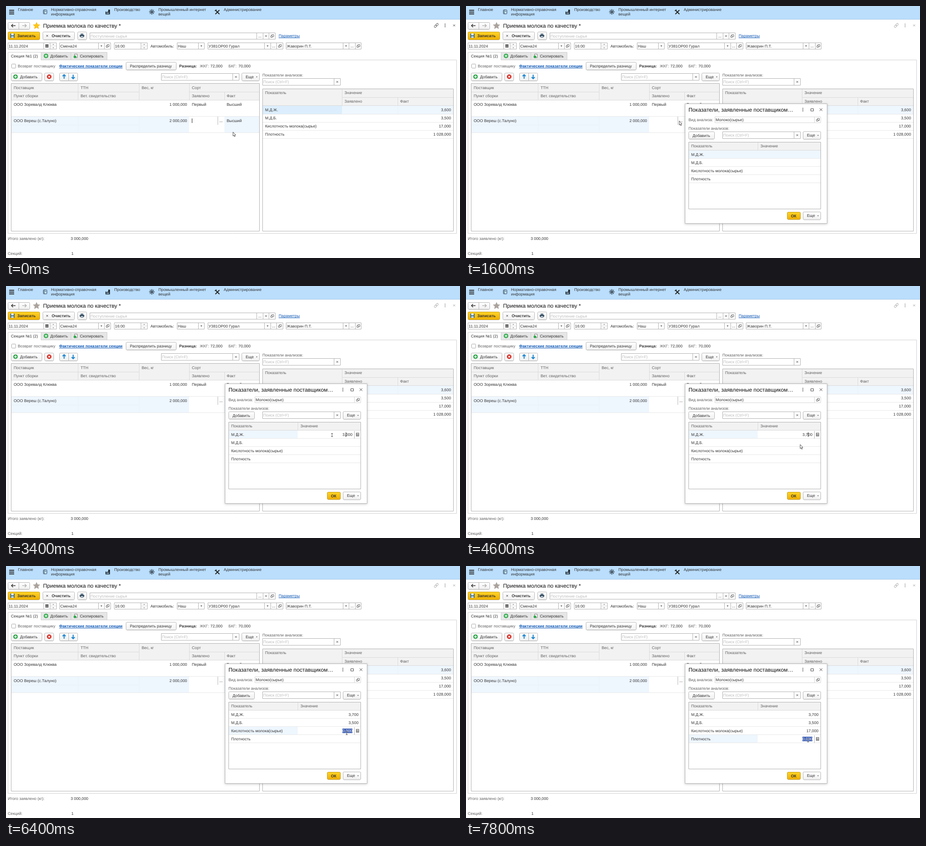
An HTML page with a canvas that plays this animation: 1004 by 558 pixels, repeating every 8 s.

```html
<!DOCTYPE html>
<html lang="ru">
<head>
<meta charset="utf-8">
<style>
html, body { margin: 0; width: 100%; height: 100%; overflow: hidden; background: #fff; }
canvas { display: block; }
</style>
</head>
<body>
<canvas id="stage" width="1004" height="558"></canvas>
<script>
const ctx = document.getElementById('stage').getContext('2d');
const LOOP = 8000, TICK = 200;
const FACE = '"Liberation Sans", Arial, sans-serif';
const TITLE = { size: 12.2, color: '#111' };
const INK = '#333', DIM = '#606060', PALE = '#bcbcbc', LINK = '#0b56b5';
const EDGE = '#b0b0b0', RULE = '#dadada', SOFT = '#e8e8e8', HEAD = '#f2f2f2', TINT = '#eef6fe';
const TINT_RULE = '#e8f0f8';

// time, x, y of the pointer
const PATH = [
  [0, 502, 279], [200, 490, 272], [400, 477, 264], [600, 467, 258], [800, 465, 256],
  [1000, 471.5, 254.5], [1600, 471.5, 254.5], [1800, 520, 280], [2000, 620, 315],
  [2200, 710, 329], [2400, 720, 330], [2600, 721, 330], [3800, 721, 330], [4200, 732, 344],
  [4600, 739, 351], [4800, 742, 354], [5000, 742.5, 354], [5800, 742.5, 354],
  [6200, 751, 367], [6400, 753.5, 370], [7400, 753.5, 370], [7600, 755, 381], [7800, 756.5, 386]
];
const BEAMS = [[2600, 3800], [6400, 7600], [7800, 8000]];

// time, edited row, text, caret index (-1: all selected, -2: not editing)
const EDITS = [
  [1600, 0, '', -2], [2400, 0, '0,000', -1], [3200, 0, '3,000', 1], [3400, 0, '3,000', 2],
  [3800, 0, '3,700', 3], [4800, 1, '0,000', -1], [5600, 1, '3,000', 2], [5800, 1, '3,500', 3],
  [6200, 2, '0,000', -1], [7200, 2, '17,000', 2], [7400, 2, '17,000', 3], [7800, 3, '0,000', -1]
];
const METRICS = ['М.Д.Ж.', 'М.Д.Б.', 'Кислотность молока(сырье)', 'Плотность'];
const DONE = ['3,700', '3,500', '17,000'];

function rect(x, y, w, h, color) {
  ctx.fillStyle = color;
  ctx.fillRect(x, y, w, h);
}
const hline = (x1, x2, y, color = RULE) => rect(x1, y, x2 - x1, 1, color);
const vline = (x, y1, y2, color = RULE) => rect(x, y1, 1, y2 - y1, color);

function frame(x1, y1, x2, y2, fill = '#fff', edge = EDGE, r = 0) {
  ctx.beginPath();
  ctx.roundRect(x1 + .5, y1 + .5, x2 - x1, y2 - y1, r);
  ctx.fillStyle = fill;
  ctx.fill();
  ctx.strokeStyle = edge;
  ctx.lineWidth = 1;
  ctx.stroke();
}

function text(s, x, y, { color = INK, bold = false, size = 8.78, right = false } = {}) {
  ctx.font = `${bold ? 'bold ' : ''}${size}px ${FACE}`;
  ctx.textAlign = right ? 'right' : 'left';
  ctx.fillStyle = color;
  ctx.fillText(s, x, y + size * .36);
  return ctx.measureText(s).width;
}
function link(s, x, y, bold) {
  const w = text(s, x, y, { color: LINK, bold });
  rect(x, y + 4, w, 1, LINK);
}

function stroke(points, color = '#444', width = 1) {
  ctx.beginPath();
  points.forEach(([x, y], i) => i ? ctx.lineTo(x, y) : ctx.moveTo(x, y));
  ctx.strokeStyle = color;
  ctx.lineWidth = width;
  ctx.stroke();
}
function poly(points, fill, edge) {
  ctx.beginPath();
  points.forEach(([x, y]) => ctx.lineTo(x, y));
  ctx.closePath();
  ctx.fillStyle = fill;
  ctx.fill();
  if (edge) { ctx.strokeStyle = edge; ctx.lineWidth = .8; ctx.stroke(); }
}
function disc(x, y, r, color) {
  ctx.beginPath();
  ctx.arc(x, y, r, 0, Math.PI * 2);
  ctx.fillStyle = color;
  ctx.fill();
}
function cross(x, y, r = 2, color = '#555', width = 1) {
  stroke([[x - r, y - r], [x + r, y + r]], color, width);
  stroke([[x - r, y + r], [x + r, y - r]], color, width);
}
const triangle = (x, y, r = 2, dir = 1) =>
  poly([[x - r, y - dir * r / 2], [x + r, y - dir * r / 2], [x, y + dir * r / 2 + dir * .4]], '#444');
function dots(x, y, color = '#444') {
  for (const d of [-2.5, 0, 2.5]) rect(x + d - .5, y + 2, 1, 1, color);
}
function kebab(x, y, color = '#555') {
  for (const d of [-3, 0, 3]) disc(x, y + d, 1, color);
}
function openIcon(x, y) {
  frame(x - 1.5, y - 3.5, x + 3, y + 1, '#fff', '#666');
  frame(x - 3.5, y - 1, x, y + 2.5, '#fff', '#666');
}
function plus(x, y) {
  disc(x, y, 5, '#2fa84a');
  stroke([[x - 3, y], [x + 3, y]], '#fff', 1.6);
  stroke([[x, y - 3], [x, y + 3]], '#fff', 1.6);
}
function arrow(x, y, dx, dy, color, width) {
  const tip = [x + dx * 4.5, y + dy * 4.5];
  stroke([[x - dx * 4.5, y - dy * 4.5], tip], color, width);
  const back = s => [x + dx + dy * s, y + dy + dx * s];
  stroke([back(3.5), tip, back(-3.5)], color, width);
}

function button(x1, y1, x2, y2, gold) {
  const g = ctx.createLinearGradient(0, y1, 0, y2);
  g.addColorStop(0, gold ? '#ffd42a' : '#fff');
  g.addColorStop(1, gold ? '#efb000' : '#f1f1f1');
  hline(x1 + 2, x2 - 1, y2 + 1, '#e4e4e4');
  frame(x1, y1, x2, y2, g, gold ? '#c79a13' : '#b5b5b5', 2);
}
function more(x, y) {
  button(x, y, x + 39, y + 17);
  text('Еще', x + 9, y + 8.5);
  triangle(x + 33.5, y + 9, 1.5);
}

// Input box; each part is [divider x, icon]
function field(x1, y1, x2, y2, value, parts = [], color = INK) {
  frame(x1, y1, x2, y2);
  const mid = (y1 + y2 + 1) / 2;
  text(value, x1 + 2, mid, { color });
  parts.forEach(([x, icon], i) => {
    vline(x, y1 + 1, y2, EDGE);
    const cx = (x + (parts[i + 1]?.[0] ?? x2) + 1) / 2;
    if (icon === 'spin') {
      hline(x, x2, Math.floor(mid), RULE);
      triangle(cx, mid - 3.5, 1.4, -1);
      triangle(cx, mid + 4, 1.4);
    } else icon(cx, mid);
  });
}
const search = (x, y) => field(x, y, x + 172, y + 15, 'Поиск (Ctrl+F)', [[x + 158, cross]], PALE);
function calendar(x, y) {
  rect(x - 3.5, y - 3.5, 7, 7, '#555');
  for (let i = 0; i < 6; i++) rect(x - 2.5 + i % 3 * 2, y - 1 + (i / 3 | 0) * 2, 1, 1, '#fff');
}

function star(x, y, dimmed) {
  const pts = Array.from({ length: 10 }, (_, i) => {
    const r = i % 2 ? 3.6 : 7.8, a = -Math.PI / 2 + i * Math.PI / 5;
    return [x + r * Math.cos(a), y + r * Math.sin(a)];
  });
  poly(pts, dimmed ? '#aaa39c' : '#ffc80a', dimmed ? '#aaa39c' : '#f0ad1c');
}

function drawMenu() {
  rect(0, 0, 1004, 29, '#badefc');
  hline(0, 1004, 29, '#a9c9e4');
  for (const y of [9, 13, 17]) rect(7, y - .5, 11, 2, '#222');
  frame(82, 8, 90, 17, '#badefc', '#345', 1);
  vline(84, 8, 18, '#345');
  hline(86, 89, 11, '#345');
  poly([[220, 18.5], [220, 12], [224, 14], [224, 12], [226, 13], [226, 8], [230, 8], [230, 18.5]], '#26323d');
  rect(222, 15, 6, 1.5, '#badefc');
  for (let i = 0; i < 8; i++) {
    const a = i * Math.PI / 4, c = Math.cos(a), s = Math.sin(a);
    stroke([[322.5, 13], [322.5 + 5 * c, 13 + 5 * s]], '#26323d', 1);
    disc(322.5 + 5 * c, 13 + 5 * s, 1, '#26323d');
  }
  disc(322.5, 13, 2.6, '#26323d');
  disc(322.5, 13, 1, '#badefc');
  stroke([[463, 9], [472, 18]], '#222', 2);
  stroke([[472, 9], [463, 18]], '#222', 2);
  stroke([[461.5, 10.5], [464.5, 10], [465, 7.5]], '#222', 1.3);
  [['Главное', 26.5, 8], ['Нормативно-справочная', 99.5, 8], ['информация', 99.5, 18],
   ['Производство', 239.5, 8], ['Промышленный интернет', 337, 8], ['вещей', 337, 18],
   ['Администрирование', 481.5, 8]].forEach(([s, x, y]) => text(s, x, y));
}

function drawToolbar(dimmed) {
  button(4, 36, 52, 51);
  vline(28, 37, 51, '#b5b5b5');
  arrow(16.5, 43.5, -1, 0, '#333', 1.5);
  arrow(40.5, 43.5, 1, 0, '#aaa', 1.3);
  star(67.5, 44, dimmed);
  text('Приемка молока по качеству *', 82, 43.5, TITLE);
  const gray = dimmed ? '#b4b4b4' : '#666';
  ctx.save();
  ctx.translate(951.5, 43);
  ctx.rotate(-Math.PI / 4);
  ctx.strokeStyle = gray;
  ctx.lineWidth = 1;
  for (const x of [-5.5, -.5]) {
    ctx.beginPath();
    ctx.roundRect(x, -2, 6, 4, 2);
    ctx.stroke();
  }
  ctx.restore();
  kebab(971, 43, dimmed ? '#999' : '#555');
  cross(991, 43, 2.2, gray);

  button(4, 57, 74, 74, true);
  rect(9.5, 61, 9.5, 9.5, '#3c6e91');
  rect(11.5, 61, 5.5, 4, '#e8f1f6');
  rect(11.5, 67, 5.5, 3.5, '#cfdde6');
  text('Записать', 25, 66, { bold: true });
  button(81, 57, 151, 74);
  cross(91, 66);
  text('Очистить', 101, 66, { bold: true });
  button(158, 57, 178, 74);
  rect(165, 61, 6, 3, '#657b8d');
  rect(163, 64, 10, 4, '#3d5468');
  frame(165, 66, 170, 69, '#fff', '#3d5468');
  field(185, 59, 595, 73, 'Поступление сырья', [[554, dots], [568, cross], [581, openIcon]], PALE);
  link('Параметры', 603, 66);

  field(4, 81, 111, 95, '11.11.2024', [[83, calendar], [97, 'spin']]);
  field(118, 81, 231, 95, 'Смена24', [[204, triangle], [217, openIcon]]);
  field(239, 81, 312, 95, '16:00', [[298, 'spin']]);
  text('Автомобиль:', 319.5, 88.5);
  field(378, 81, 438, 95, 'Наш', [[425, triangle]]);
  field(446, 81, 612, 95, 'У381ОР00 Гурал', [[571, triangle], [585, dots], [598, openIcon]]);
  field(619, 81, 785, 95, 'Жаворин П.Т.', [[745, triangle], [758, dots], [772, openIcon]]);
}

function drawPanel() {
  frame(4, 119, 996, 503, '#fff', '#d0d0d0');
  frame(77, 102, 143, 119, '#e6e6e6', '#cecece');
  frame(143, 102, 223, 119, '#e6e6e6', '#cecece');
  frame(4, 102, 77, 119, '#fff', '#d0d0d0');
  hline(5, 77, 119, '#fff');
  text('Секция №1 (2)', 11, 110.5);
  plus(88.5, 110.5);
  text('Добавить', 98, 110.5);
  frame(151, 106, 157, 114, '#fff', '#777');
  disc(152.5, 112.5, 3, '#2fa84a');
  text('Скопировать', 163.5, 110.5);

  frame(12, 128, 21, 137, '#fff', '#a6a6a6', 1);
  text('Возврат поставщику', 26, 133, { color: DIM });
  link('Фактические показатели секции', 117.5, 133, true);
  button(265, 124, 376, 141);
  text('Распределить разницу', 274, 132.5);
  text('Разница:', 383, 133, { bold: true });
  text('ЖКГ:', 428.5, 133, { color: DIM });
  text('72,000', 452, 133);
  text('БКГ:', 492, 133, { color: DIM });
  text('70,000', 514, 133);

  button(11, 148, 79, 165);
  plus(21, 156.5);
  text('Добавить', 31, 156.5);
  button(85, 148, 105, 165);
  disc(95.5, 156.5, 5, '#d9261c');
  cross(95.5, 156.5, 2, '#fff', 1.5);
  button(118, 148, 158, 165);
  vline(138, 149, 165, '#b5b5b5');
  arrow(128.5, 156.5, 0, -1, '#1c86d1', 2.2);
  arrow(148.5, 156.5, 0, 1, '#1c86d1', 2.2);
  search(343, 149);
  more(521, 148);
  text('Показатели анализов:', 567, 152.5, { color: DIM });
  search(567, 160);
  text('Итого заявлено (кг):', 4, 515, { color: DIM });
  text('3 000,000', 143, 515);
  text('Секций:', 4, 547.5, { color: DIM });
  text('1', 144.5, 547.5);
}

function drawSuppliers(t) {
  frame(11, 171, 560, 498);
  rect(12, 172, 548, 37, HEAD);
  hline(12, 294, 190);
  hline(405, 560, 190);
  hline(12, 560, 208);
  for (const x of [159, 294, 405]) vline(x, 172, 209);
  vline(483, 190, 209);
  [['Поставщик', 17, 180.5], ['Пункт сборки', 17, 199], ['ТТН', 165, 180.5],
   ['Вет. свидетельство', 165, 199], ['Вес, кг', 300, 180.5], ['Сорт', 411, 180.5],
   ['Заявлено', 411, 199], ['Факт', 488, 199]]
    .forEach(([s, x, y]) => text(s, x, y, { color: DIM }));

  hline(12, 560, 244, SOFT);
  rect(12, 245, 548, 36, TINT);
  hline(12, 294, 263, TINT_RULE);
  vline(159, 245, 280, TINT_RULE);
  vline(294, 245, 280, TINT_RULE);
  hline(12, 560, 280, SOFT);
  [['ООО Зоревалд Клюква', '1 000,000', 218], ['ООО Вереш (с.Талуно)', '2 000,000', 254]]
    .forEach(([name, weight, y]) => {
      text(name, 17, y);
      text(weight, 400.5, y, { right: true });
      text('Высший', 488, y);
    });
  text('Первый', 411, 218);

  rect(405, 245, 78, 35, '#fff');
  const pressed = t >= 1400 && t < 1600;
  if (pressed) rect(469, 245, 8, 18, '#e4e4e4');
  vline(468, 245, 263, pressed ? '#d0d0d0' : '#b5b5b5');
  dots(pressed ? 476.5 : 475.5, 254);
  if (t < 1400) vline(411, 249, 259, '#222');
}

function drawAnalyses() {
  frame(567, 183, 989, 498);
  rect(568, 184, 421, 37, HEAD);
  hline(743, 989, 202);
  hline(568, 989, 220);
  vline(743, 184, 221);
  vline(866, 202, 221);
  text('Показатель', 573, 192, { color: DIM });
  text('Значение', 748.5, 192, { color: DIM });
  text('Заявлено', 748.5, 211, { color: DIM });
  text('Факт', 871.5, 211, { color: DIM });
  rect(568, 221, 421, 18, TINT);
  rect(568, 221, 175, 18, '#dceefd');
  vline(866, 221, 239, TINT_RULE);
  ['3,600', '3,500', '17,000', '1 028,000'].forEach((value, i) => {
    const y = 230 + i * 18;
    hline(568, 989, y + 9, SOFT);
    text(METRICS[i], 573, y);
    text(value, 984, y, { right: true });
  });
}

function drawEditor(row, value, caret) {
  const y = 329 + row * 18, right = 766;
  vline(770, y - 8, y + 9, '#b5b5b5');
  frame(774, y - 4, 780, y + 3, '#777', '#777');
  rect(775.5, y - 2.5, 4.5, 1.5, '#fff');
  for (let i = 0; i < 6; i++) rect(775.5 + i % 3 * 1.7, y + (i / 3 | 0) * 2, 1, 1, '#fff');
  if (caret === -1) rect(744, y - 5, 22, 10, '#3e5fb4');
  const w = text(value, right, y, { right: true, color: caret === -1 ? '#fff' : INK });
  if (caret > 0) {
    const x = right - w + ctx.measureText(value.slice(0, caret)).width;
    rect(x, y - 5, 1, 10, '#111');
  }
}

function drawDialog([, row, value, caret]) {
  ctx.save();
  ctx.shadowColor = 'rgba(0,0,0,.22)';
  ctx.shadowBlur = 5;
  ctx.shadowOffsetY = 1;
  rect(484, 216, 315, 266, '#fff');
  ctx.restore();
  frame(484, 216, 798, 481, '#fff', '#b4b4b4');
  text('Показатели, заявленные поставщиком…', 492, 230, TITLE);
  kebab(745, 229.5);
  frame(762, 227, 768, 232, '#fff', '#444');
  cross(785, 229.5, 3, '#444');
  text('Вид анализа:', 492, 252, { color: DIM });
  frame(550, 245, 784, 258, '#fff', '#d4d4d4');
  text('Молоко(сырье)', 552, 252);
  vline(770, 246, 258, '#d4d4d4');
  openIcon(778, 252);
  text('Показатели анализов:', 492, 270.5, { color: DIM });
  button(492, 278, 549, 294);
  text('Добавить', 501, 286.5);
  search(567, 278);
  more(745, 277.5);

  frame(492, 301, 784, 449);
  rect(493, 302, 291, 17, HEAD);
  hline(493, 784, 319);
  vline(645, 302, 319);
  text('Показатель', 498, 310, { color: DIM });
  text('Значение', 651, 310, { color: DIM });
  const editing = caret > -2;
  rect(493, 320 + row * 18, editing ? 152 : 291, 17, TINT);
  METRICS.forEach((name, i) => {
    const y = 329 + i * 18;
    hline(493, 784, y + 8, SOFT);
    text(name, 498, y);
    if (i < row) text(DONE[i], 779.5, y, { right: true });
  });
  if (editing) drawEditor(row, value, caret);

  button(710, 456, 739, 472, true);
  text('ОК', 718.5, 464.5, { bold: true });
  more(745, 455.5);
}

function drawPointer(t) {
  const next = PATH.findIndex(p => p[0] > t);
  const b = next < 0 ? PATH.at(-1) : PATH[next];
  const a = next < 0 ? b : PATH[next - 1];
  const k = a === b ? 0 : (t - a[0]) / (b[0] - a[0]);
  const x = a[1] + (b[1] - a[1]) * k, y = a[2] + (b[2] - a[2]) * k;
  if (BEAMS.some(([from, to]) => t >= from && t < to)) {
    const beam = (color, w) => {
      stroke([[x, y - 3.5], [x, y + 3.5]], color, w);
      for (const d of [-3.5, 3.5]) stroke([[x - 2, y + d], [x + 2, y + d]], color, w);
    };
    if (t >= 6400) beam('#d8deee', 1.4);
    beam('#444', .9);
    return;
  }
  poly([[0, 0], [0, 9], [2, 7.2], [3.4, 10.4], [4.9, 9.7], [3.5, 6.7], [6, 6.5]]
    .map(([dx, dy]) => [x + dx, y + dy]), '#fff', '#222');
}

function draw(now) {
  const t = Math.floor(now % LOOP / TICK) * TICK;
  const edit = EDITS.findLast(e => e[0] <= t);
  ctx.textRendering = 'geometricPrecision';
  rect(0, 0, 1004, 558, '#fff');
  drawMenu();
  drawToolbar(!!edit);
  drawPanel();
  drawSuppliers(t);
  drawAnalyses();
  if (edit) drawDialog(edit);
  drawPointer(t);
}

const start = performance.now();
function loop() {
  draw(performance.now() - start);
  requestAnimationFrame(loop);
}
loop();
</script>
</body>
</html>
```
